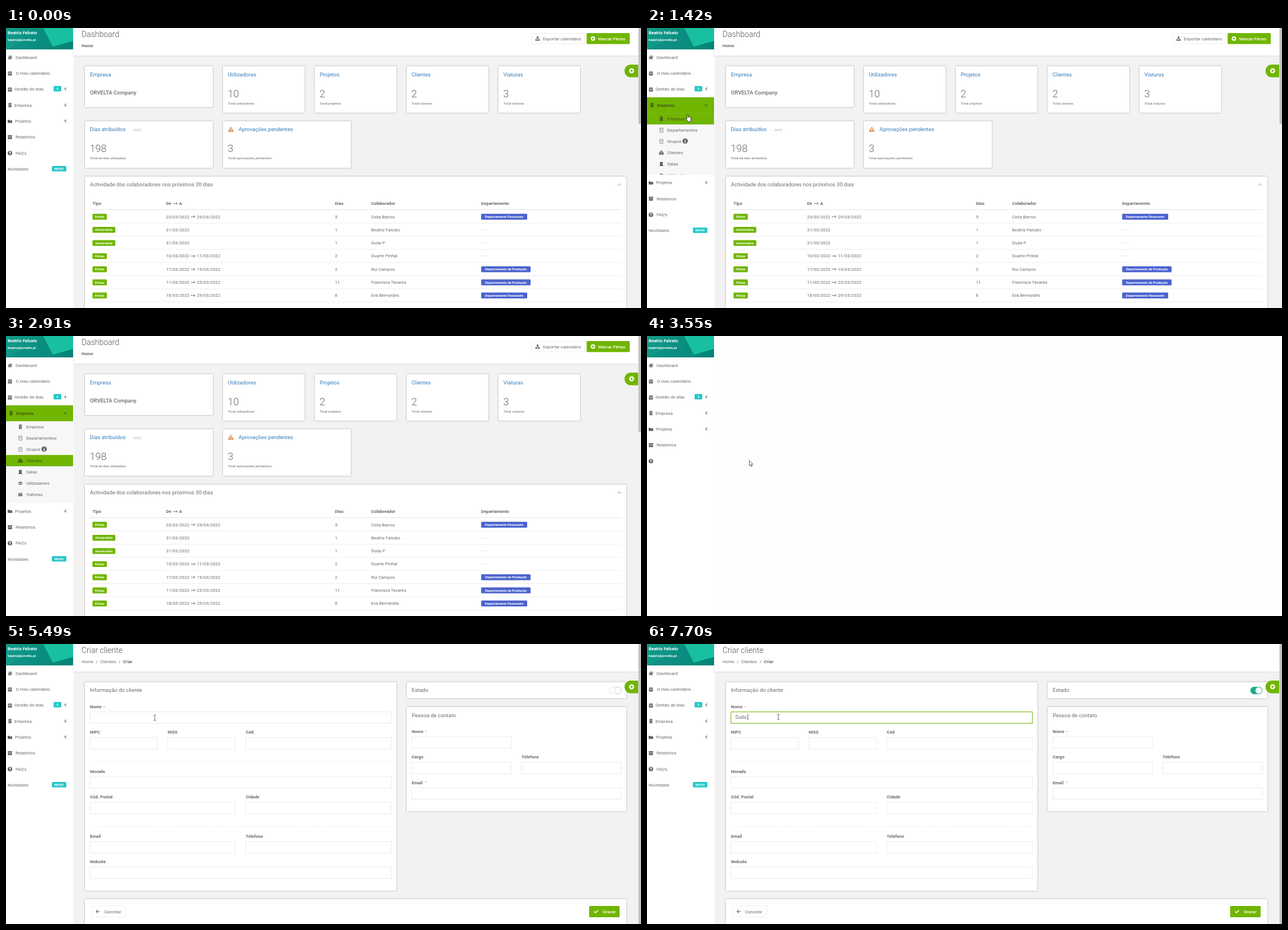
An HTML page for the animation above (8000 ms loop, 1127 by 497 pixels).

```html
<!DOCTYPE html>
<html lang="pt">
<head>
<meta charset="utf-8">
<title>Criar cliente</title>
<style>
html,body{margin:0;width:100%;height:100%;overflow:hidden;background:#fefefe}
svg{display:block;width:100%;height:100%}
text{font:400 7.8px Roboto,sans-serif;fill:#676a6c;white-space:pre}
path{fill-rule:evenodd}
text.b{font-weight:700;font-size:7.75px}
text.m{font-weight:500}
text.h{font-size:9.5px}
text.t{font-size:14px;font-weight:300;fill:#555}
text.n{font-size:18px;font-weight:300}
text.s{font-size:6.2px}
text.tag{font-size:6px;font-weight:700;fill:#fff}
text.in{font-size:8.4px}
text.c{text-anchor:middle}
text.l{fill:#337ab7}
text.w{fill:#fff}
text.g{fill:#a5a7a9}
.panel{fill:#fff;filter:drop-shadow(0 .9px .8px rgba(0,0,0,.4))}
.field{fill:#fff;stroke:#e3e5e7;stroke-width:.8}
.rule{stroke:#e7e9eb;stroke-width:.8}
.line{fill:none;stroke:#676a6c;stroke-width:1.1}
.hl{fill:none}
.on>.hl{fill:#70b500}
.on>text,.on>path{fill:#44591d}
.on>.line{fill:none;stroke:#44591d}
.open>.label{font-weight:600}
</style>
</head>
<body>
<svg id="stage" viewBox="0 0 1127 497"></svg>
<script>
const GREEN = '#70b500', TEAL = '#23c6c8', GREY = '#5f6264', BLUE = '#4b63cf';
const LOOP = 8000, TICK = 78.5;

const DISC = 'M8 0a8 8 0 1 0 0 16A8 8 0 1 0 8 0z';
const BLOCK = 'M5 3v2h2V3zm4 0v2h2V3zM5 7v2h2V7zm4 0v2h2V7z';
const ICONS = {
  home: 'M8 1L0 8l1 1.4 7-6 7 6L16 8l-2-1.8V2h-2v2.4zM2.5 9.8V15H7v-4h2v4h4.500V9.800L8 5z',
  cal: 'M1 3h3V0h2v3h4V0h2v3h3v3H1zM1 7h14v9H1zM4 9v2h8V9z',
  building: 'M3 0h10v16H9v-4H7v4H3z' + BLOCK,
  office: 'M2 0h12v16H2zM3.300 1.300v13.400h9.400V1.300z' + BLOCK,
  folder: 'M0 3h6l2 2h8v9H0z',
  archive: 'M0 1h16v4H0zM1 6h14v9H1zM6 8v2h4V8z',
  help: DISC + 'M4.500 6a3.500 3.500 0 1 1 4.700 3.300V10H7V8c3-1 2.500-3 1-3q-1 0-1 1zM7 11h2.200v2.200H7z',
  plus: DISC + 'M6.800 3.500h2.400v3.300h3.300v2.400H9.200v3.300H6.800V9.200H3.500V6.800h3.300z',
  ok: DISC + 'M3.500 8.300l1.600-1.600L7 8.600l4-4 1.600 1.600L7 11.800z',
  info: DISC + 'M7 3h2.200v2H7zM6 6.500h3.200V11h1v2H6v-2h1V8.500H6z',
  city: 'M0 6h4V1h7v5h5v9H0zM2 8v2h2V8zM6 4v2h3V4zM6 8v2h3V8zM11 8v2h3V8z',
  door: 'M3 1h10v13h3v1.500H0V14h3zM9.500 7v2h1.500V7z',
  users: 'M8 2a3 3 0 1 0 .01 0zM3 4a2 2 0 1 0 .01 0zM13 4a2 2 0 1 0 .01 0zM4 14q0-5 4-5t4 5zM0 12q0-3 3-3l1 .5-1 2.500zM16 12q0-3-3-3l-1 .5 1 2.500z',
  car: 'M1 7l2-5h10l2 5v8h-3v-2H4v2H1zM4 6h8l-1-2.500H5zM3 8.500v2h2.500v-2zM10.500 8.500v2H13v-2z',
  download: 'M6 0h4v6h3.500L8 11.500 2.500 6H6zM0 11h4l3 2.500h2L12 11h4v5H0z',
  eye: 'M0 8Q8-2 16 8Q8 18 0 8zM8 4.500a3.500 3.500 0 1 0 .01 0zM8 6.500a1.500 1.500 0 1 0 .01 0z',
  warn: 'M8 1L16 15H0zM7 5.500v4.500h2V5.500zM7 11v2h2v-2z'
};

const icon = (name, cx, cy, size = 8, fill = GREY) =>
  `<path d="${ICONS[name]}" fill="${fill}" transform="translate(${cx - size / 2} ${cy - size / 2}) scale(${size / 16})"/>`;
const text = (x, y, s, cls = '') => `<text x="${x}" y="${y}" class="${cls}">${s}</text>`;
const rect = (x, y, x2, y2, attrs) => `<rect x="${x}" y="${y}" width="${x2 - x}" height="${y2 - y}" ${attrs}/>`;
const panel = (x, y, x2, y2) => rect(x, y, x2, y2, 'class="panel" rx=".6"');
const field = (x, y, x2, h = 20.3) => rect(x, y, x2, y + h, 'class="field"');
const rule = (x, y, x2, extra = '') => `<path class="rule" d="M${x} ${y}H${x2}" ${extra}/>`;
const stroke = (d, attrs = '') => `<path class="line" d="${d}" ${attrs}/>`;
const labelled = (x, y, x2, name, required) => text(x, y - 6.7, name, 'b') + field(x, y, x2) +
  (required ? `<text x="${x + 24}" y="${y - 7}" style="font-size:6px;fill:#d66">*</text>` : '');
const tag = (x, cy, x2, s, fill) => rect(x, cy - 5.2, x2, cy + 5.2, `rx="1.5" fill="${fill}"`) +
  text((x + x2) / 2, cy + 2.1, s, 'tag c');
const button = (x, y, x2, y2, fill, attrs = '') => rect(x, y, x2, y2, `rx="1.5" fill="${fill}" ${attrs}`);
const group = (id, body, attrs = '') => `<g id="${id}" ${attrs}>${body}</g>`;

function frame(title, crumbs, right) {
  const path = crumbs.map(([x, s], i) => text(x, 34, s, i == crumbs.length - 1 ? 'b' : '')).join('');
  return rect(120, 0, 1127, 497, 'fill="#f2f2f2"') +
    rect(120, -5, right, 49, 'fill="#fff" style="filter:drop-shadow(0 .6px .8px rgba(0,0,0,.22))"') +
    text(134, 16, title, 't') + path;
}
const floatingTab = x => `<path fill="${GREEN}" d="M1127 65H${x + 11}a11.200 11.200 0 0 0 0 22.500H1127z"/>` +
  icon('plus', x + 12.3, 76, 9, '#fff');
const scrollbar = bottom => rect(1122, 0, 1127, 497, 'fill="#f1f1f1"') + rect(1122.6, 0, 1127, bottom, 'fill="#c1c1c1"');

function dashboard() {
  const stat = (x, y, x2, title, n, note, dx = 0) => panel(x, y, x2, y + 83) +
    text(x + 8.7 + dx, y + 18, title, 'h l') + text(x + 8.5, y + 55, n, 'n') + text(x + 8.7, y + 68, note, 's');
  const arrow = (x, y) => stroke(`M${x} ${y}h7.500m-2.300-2l2.300 2-2.300 2`, 'style="stroke-width:.9"');
  const FIN = 'Departamento Financeiro', PROD = 'Departamento de Produção';
  const rows = [
    ['23/03/2022', '29/03/2022', 5, 'Celia Barros', FIN],
    ['31/03/2022', '', 1, 'Beatriz Falcato'],
    ['31/03/2022', '', 1, 'Duda P'],
    ['10/03/2022', '11/03/2022', 2, 'Duarte Pinhal'],
    ['17/03/2022', '19/03/2022', 2, 'Rui Campos', PROD],
    ['11/03/2022', '25/03/2022', 11, 'Francisca Tavares', PROD],
    ['18/03/2022', '29/03/2022', 8, 'Eva Bernardes', FIN]
  ];
  const table = rows.map(([from, to, days, who, dept], i) => {
    const cy = 335 + 23.3 * i, y = cy + 2.5;
    return (to ? tag(153.5, cy, 179, 'Férias', GREEN) : tag(153.5, cy, 194, 'Aniversário', GREEN)) +
      text(284, y, from) + (to ? arrow(328, y - 2.6) + text(338.8, y, to) : '') +
      text(583.7, y, days) + text(648, y, who) +
      (dept ? tag(843.3, cy, dept == FIN ? 925 : 931, dept, BLUE) : text(843.3, y, '- - -', 'g')) +
      rule(149, cy + 11.3, 1092);
  }).join('');
  const heads = [[153.5, 'Tipo'], [284, 'De'], [307.3, 'A'], [583.7, 'Dias'], [648, 'Colaborador'], [843.3, 'Departamento']];
  return frame('Dashboard', [[134, 'Home']], 1122) +
    button(932.5, 9.5, 1027, 28, '#fff', 'stroke="#e9ebed" stroke-width=".8"') + icon('download', 943.5, 18.5) +
    text(953, 21.5, 'Exportar calendário') +
    button(1030.5, 9, 1107, 28.5, GREEN) + icon('plus', 1041.7, 18.7, 8, '#fff') + text(1051, 21.5, 'Marcar Férias', 'm w') +
    panel(140, 67.5, 367, 140.5) + text(149, 85.5, 'Empresa', 'h l') + text(149, 117.5, 'ORVELTA Company', 'h m') +
    stat(385, 67.5, 530, 'Utilizadores', 10, 'Total utilizadores') +
    stat(548, 67.5, 693, 'Projetos', 2, 'Total projetos') +
    stat(711, 67.5, 856, 'Clientes', 2, 'Total clientes') +
    stat(874, 67.5, 1019, 'Viaturas', 3, 'Total viaturas') +
    stat(140, 165.3, 367, 'Dias atribuídos', 198, 'Total de dias atribuídos') + text(220, 183, '-   2022', 's g') +
    stat(385, 165.3, 612, 'Aprovações pendentes', 3, 'Total aprovações pendentes', 19) + icon('warn', 399, 179.5, 11, '#e8935a') +
    panel(140, 263.5, 1101, 510) + text(149, 281.3, 'Actividade dos colaboradores nos próximos 30 dias', 'h') +
    stroke('M1085.300 279.700l3.200-3.200 3.200 3.200', 'style="stroke:#b4b6b8"') +
    heads.map(([x, s]) => text(x, 314.2, s, 'b')).join('') + arrow(296.5, 311.6) +
    rule(149, 322.5, 1092, 'style="stroke:#dcdfe1"') + table + floatingTab(1098) + scrollbar(170);
}

function clients() {
  const dateField = (x, hint) => field(x, 91, x + 144) + rule(x, 91, x) +
    `<path class="rule" d="M${x + 25} 91v20.300"/>` + icon('cal', x + 12.5, 101) + text(x + 31.5, 104, hint, 'in g');
  const row = (y, name) => text(153.5, y, name, 'l') + text(153.5, y + 9, '- - -', 's') + text(457, y, '- - -', 'c g') +
    text(671.5, y, '07-03-2022', 'c') + icon('ok', 900.5, y - 3, 10, GREEN) +
    button(1081.5, y - 10, 1097, y + 5, '#fff', 'stroke="#e7eaec" stroke-width=".8"') +
    icon('eye', 1089.3, y - 2.5, 7.5) + rule(149, y + 16.6, 1101);
  return frame('Clientes', [[134, 'Home'], [159.5, '/'], [167, 'Clientes']], 1127) +
    button(1055, 9, 1117, 28.5, GREEN, 'id="add"') + icon('plus', 1066.5, 18.7, 8, '#fff') + text(1076.3, 21.5, 'Adicionar', 'm w') +
    panel(140, 67.5, 1111, 124) + labelled(149, 91, 374, 'Pesquisar') +
    text(391.5, 84.3, 'Data de criação', 'b') + dateField(391.5, 'Desde') + dateField(553.5, 'Até') +
    labelled(715, 91, 859, 'Estado') + stroke('M849.500 99.800l3 3 3-3', 'style="stroke:#333"') +
    button(977, 90.5, 1026.5, 110, GREEN) + text(1001.8, 103.2, 'Pesquisar', 'c m w') +
    button(1029, 90.5, 1102, 110, '#6c757d') + text(1065.5, 103.2, 'Limpar Pesquisa', 'c m w') +
    panel(140, 138.7, 1111, 304) + text(149, 156.8, 'Lista de clientes', 'h') + text(225, 156.5, '-   2 clientes', 's g') +
    text(153.5, 189.6, 'Nome', 'b') + text(457, 189.6, 'NIPC', 'b c') +
    text(671.5, 189.6, 'Data de criação', 'b c') + text(901, 189.6, 'Estado', 'b c') +
    rule(149, 197.7, 1101, 'style="stroke:#dcdfe1"') + row(213, 'Eva Queirós') + row(244.5, 'Caio Serpa') + floatingTab(1108);
}

function createForm() {
  const dashed = y => rule(149, y, 684, 'stroke-dasharray="2 1.500"');
  return frame('Criar cliente', [[134, 'Home'], [159.5, '/'], [167, 'Clientes'], [200, '/'], [207.5, 'Criar']], 1122) +
    panel(140, 67.5, 693, 438) + text(149, 85.3, 'Informação do cliente', 'h') +
    labelled(149, 120.5, 684, 'Nome', true) +
    labelled(149, 166, 269, 'NIPC') + labelled(287, 166, 407, 'NISS') + labelled(425.5, 166, 684, 'CAE') + dashed(208.5) +
    labelled(149, 235.8, 684, 'Morada') +
    labelled(149, 281, 407, 'Cód. Postal') + labelled(425.5, 281, 684, 'Cidade') + dashed(323.5) +
    labelled(149, 350.7, 407, 'Email') + labelled(425.5, 350.7, 684, 'Telefone') + labelled(149, 396, 684, 'Website') +
    panel(711, 67.5, 1101, 96.5) + text(720, 85.3, 'Estado', 'h') +
    rect(1071.3, 76.3, 1092, 88.7, 'id="toggle" rx="6.2" stroke-width=".8"') +
    '<circle cx="1085.700" cy="82.500" r="5.800" fill="#fff" stroke="#bbb" stroke-width=".6"/>' +
    panel(711, 111.7, 1101, 297) + text(720, 129.5, 'Pessoa de contato', 'h') +
    labelled(720, 164.8, 897, 'Nome', true) + labelled(720, 210, 897, 'Cargo') + labelled(915, 210, 1092, 'Telefone') +
    labelled(720, 255.3, 1092, 'Email', true) +
    panel(140, 452.8, 1101, 510) +
    button(152, 465, 212.5, 485, '#fff', 'stroke="#e7eaec" stroke-width=".8"') +
    stroke('M166.500 474.700h-6.500m2.800-2.800l-2.800 2.800 2.800 2.800') + text(174, 477.5, 'Cancelar') +
    button(1035, 465, 1089, 485, GREEN) +
    stroke('M1043.800 474.800l2.300 2.300 4.600-4.600', 'style="stroke:#fff;stroke-width:1.600"') + text(1059, 477.5, 'Gravar', 'm w') +
    floatingTab(1098) + scrollbar(497) +
    group('focus', rect(149, 120.5, 684, 140.8, `fill="none" stroke="${GREEN}"`)) +
    text(157, 133, '', 'in" id="typed') + '<path id="caret" d="M0 124.500v10.500" stroke="#333" stroke-width=".9"/>' +
    group('suggest', rect(157.5, 143, 315.5, 281, 'id="list" class="panel"') +
      ['Duda', 'Dalila', 'Lara', 'Mafalda', 'Simão', 'Xavier'].map((s, i) => text(166, 158 + 22.3 * i, s)).join(''));
}

function sidebar() {
  const item = (i, label, glyph, x, extra = '') => {
    const cy = 52 + 28.35 * i;
    return `<g id="item${i}">${rect(0, cy - 14, 119, cy + 14.2, 'class="hl"')}` +
      (glyph ? icon(glyph, 7, cy) : '') + text(x, cy + 2.7, label, 'label') + extra + '</g>';
  };
  const left = cy => stroke(`M106.500 ${cy - 2.3}l-2.300 2.300 2.300 2.300`, 'style="stroke-width:1.200"');
  const sub = (i, label, glyph) => {
    const cy = 161.2 + 20 * i;
    return `<g class="sub">${rect(0, cy - 10, 119, cy + 10, 'class="hl"')}${icon(glyph, 25.5, cy, 8)}${text(36, cy + 2.7, label)}` +
      (label == 'Grupos' ? icon('info', 67.7, cy - .5, 9.5) : '') + '</g>';
  };
  const subs = [['Empresa', 'building'], ['Departamentos', 'office'], ['Grupos', 'office'], ['Clientes', 'city'],
    ['Salas', 'door'], ['Utilizadores', 'users'], ['Viaturas', 'car']];
  return rect(0, 0, 119, 497, 'fill="#fff" style="filter:drop-shadow(.7px 0 .6px rgba(0,0,0,.3))"') +
    '<linearGradient id="teal"><stop stop-color="#129b8a"/><stop offset="1" stop-color="#038377"/></linearGradient>' +
    rect(0, 0, 119, 38, 'fill="url(#teal)"') +
    '<path d="M66 0H119V23L83 33z" fill="#19c0a0"/><path d="M0 38L40 20 83 33 70 38z" fill="#0b8d7f" opacity=".6"/>' +
    text(3, 10.7, 'Beatriz Falcato', 'b w') + text(3, 22.7, 'beatriz@orvelta.pt', 'tag') +
    rect(0, 123, 119, 151, 'id="shade" fill="#f7f7f8"') +
    item(0, 'Dashboard', 'home', 17) + item(1, 'O meu calendário', 'cal', 17.5) +
    item(2, 'Gestão de dias', 'cal', 15, rect(84.5, 103, 98, 112.5, `rx="1" fill="${TEAL}"`) +
      '<text x="91.200" y="110" class="tag c" style="fill:#fff">3</text>' + left(108)) +
    item(3, 'Empresa', 'building', 15, group('closedMark', left(136.7)) +
      stroke('M102.500 135.700l2.400 2.400 2.400-2.400', 'id="openMark"')) +
    '<clipPath id="clip"><rect id="clipBox" y="151" width="119"/></clipPath>' +
    `<g clip-path="url(#clip)">${subs.map((s, i) => sub(i, ...s)).join('')}</g>` +
    group('lower', item(4, 'Projetos', 'folder', 16, left(165)) + item(5, 'Relatórios', 'archive', 17) +
      item(6, "FAQ's", 'help', 17) +
      item(7, 'Novidades', '', 3, rect(81.5, 245, 107, 254.5, `rx="1" fill="${TEAL}"`) + text(94.3, 252, 'NOVO', 'tag c')));
}

const pointers = group('arrow', '<path d="M0 0v9.500l2.200-2 1.500 3.400 1.500-.7-1.500-3.300h3z" fill="#fff" stroke="#333" stroke-width=".8"/>') +
  group('hand', '<path d="M-1 1q1-1.700 2 0v4.200q1-.8 1.700.2 1-.6 1.700.4 1.400-.5 1.600 1v3q-.3 2-1.200 2.500v1.500H.3v-1.500L-3 7.800q-.2-1.500 2 .4z" fill="#fff" stroke="#222" stroke-width=".9"/>') +
  group('beam', '<path d="M-2-4.700h1.500l.5.500.5-.5H2M-2 4.700h1.500l.5-.5.5.5H2M0-4.500v9" fill="none" stroke="#555" stroke-width=".9"/>');

document.getElementById('stage').innerHTML = group('dash', dashboard()) + group('clients', clients()) +
  group('form', createForm()) + group('side', sidebar()) + pointers;

const $ = id => document.getElementById(id);
const set = (el, attrs) => { for (const k in attrs) el.setAttribute(k, attrs[k]); };
const show = (id, on) => { $(id).style.display = on ? '' : 'none'; };
const ramp = (t, a, b) => Math.min(1, Math.max(0, (t - a) / (b - a)));
const stepAt = (table, t) => table.reduce((value, [at, next]) => t >= at ? next : value, undefined);
const subItems = [...document.querySelectorAll('.sub')];

// time, x, y, pointer shape from here on
const PATH = [
  [0, 750, 370, ''], [70, 750, 370, 'arrow'], [390, 400, 230, 'arrow'], [620, 108, 118, 'hand'], [720, 88, 113, 'hand'],
  [860, 80, 128, 'hand'], [1100, 74, 138, 'hand'], [1320, 72, 143, 'hand'], [1410, 72, 153, 'hand'],
  [1720, 72, 153, 'hand'], [2040, 84, 213, 'hand'], [2130, 84, 213, 'hand'], [2195, 81, 209, 'hand'],
  [2280, 81, 209, 'hand'], [2350, 81, 202.5, 'hand'], [2520, 81, 202.5, 'hand'], [2590, 81, 217, 'hand'],
  [2745, 82, 211.5, 'hand'], [2900, 82, 211.5, ''], [3370, 160, 222, 'arrow'], [3530, 181, 221, 'arrow'],
  [3620, 200, 215, 'arrow'], [4000, 516, 139, 'arrow'], [4090, 516, 139, 'arrow'], [4390, 1072, 27, 'hand'],
  [4470, 1080.5, 25, 'hand'], [5020, 1080, 26, 'arrow'], [5100, 1060, 32, 'arrow'], [5410, 264, 131, 'beam'],
  [5800, 264, 131, 'beam'], [6040, 233, 129.3, 'beam'], [LOOP, 233, 129.3, 'beam']
];
const SUB_HOVER = [[0, -1], [1380, 0], [1760, 1], [1880, 2], [1960, 3], [2190, 2], [2580, 3], [3370, -1]];
const TYPED = [[0, ''], [6820, 'D'], [7060, 'Du'], [7450, 'Dud'], [7530, 'Duda'], [7690, 'Duda ']];
const SUGGESTIONS = [[0, 0], [6350, 6], [6820, 2], [7060, 1], [7140, 0]];

function movePointer(t) {
  const i = PATH.findLastIndex(k => k[0] <= t);
  const a = PATH[i], b = PATH[i + 1] || a;
  const p = ramp(t, a[0], b[0] + 1e-6);
  for (const shape of ['arrow', 'hand', 'beam']) {
    show(shape, a[3] == shape);
    set($(shape), { transform: `translate(${a[1] + (b[1] - a[1]) * p} ${a[2] + (b[2] - a[2]) * p})` });
  }
}

function drawSidebar(t) {
  const loading = t > 3370 && t < 3640 || t > 5020 && t < 5100;
  const slide = 1 - Math.pow(1 - ramp(t, 1240, 1610), 2.2);
  const shift = t < 3370 ? 145.7 * slide : t > 3640 && t < 5020 ? 145.7 : 0;
  const open = shift > 0;
  set($('clipBox'), { height: shift });
  set($('shade'), { height: open ? 28 + shift : 0 });
  set($('lower'), { transform: `translate(0 ${shift})` });
  set($('item2'), { class: t > 620 && t < 860 ? 'on' : '' });
  set($('item3'), { class: (t > 860 && t < 2980 ? 'on ' : '') + (open ? 'open' : '') });
  set($('item3').querySelector('.label'), { x: open ? 18 : 15 });
  set($('item3').querySelector('path'), { transform: `translate(${open ? 5 : 3} 133) scale(.5)` });
  show('closedMark', !open);
  show('openMark', open);
  show('item7', !loading);
  $('item6').querySelector('text').style.display = loading ? 'none' : '';
  const hover = stepAt(SUB_HOVER, t);
  subItems.forEach((el, i) => el.classList.toggle('on', i == hover));
}

function drawForm(t) {
  const on = ramp(t, 5500, 5960), focused = t > 6040;
  const mix = (a, b) => Math.round(a + (b - a) * on);
  set($('toggle'), {
    fill: `rgb(${mix(255, 26)},${mix(255, 171)},${mix(255, 143)})`,
    stroke: `rgb(${mix(223, 26)},${mix(223, 171)},${mix(223, 143)})`
  });
  show('focus', focused);
  show('caret', focused);
  $('typed').textContent = stepAt(TYPED, t);
  set($('caret'), { transform: `translate(${157.5 + $('typed').getComputedTextLength()} 0)` });
  const count = stepAt(SUGGESTIONS, t);
  show('suggest', count);
  set($('list'), { height: 4 + 22.3 * count });
  $('suggest').querySelectorAll('text').forEach((el, i) => { el.style.display = i < count ? '' : 'none'; });
}

function render(now) {
  const t = Math.floor((now % LOOP) / TICK) * TICK;
  show('dash', t < 3370);
  show('clients', t > 3600 && t < 5020);
  show('form', t > 5100);
  $('clients').style.opacity = ramp(t, 3560, 3800);
  $('form').style.opacity = ramp(t, 5090, 5330);
  set($('add'), { fill: t > 4380 ? '#8fe010' : GREEN });
  drawSidebar(t);
  drawForm(t);
  movePointer(t);
}

const start = performance.now();
(function loop() {
  render(performance.now() - start);
  requestAnimationFrame(loop);
})();
</script>
</body>
</html>
```
